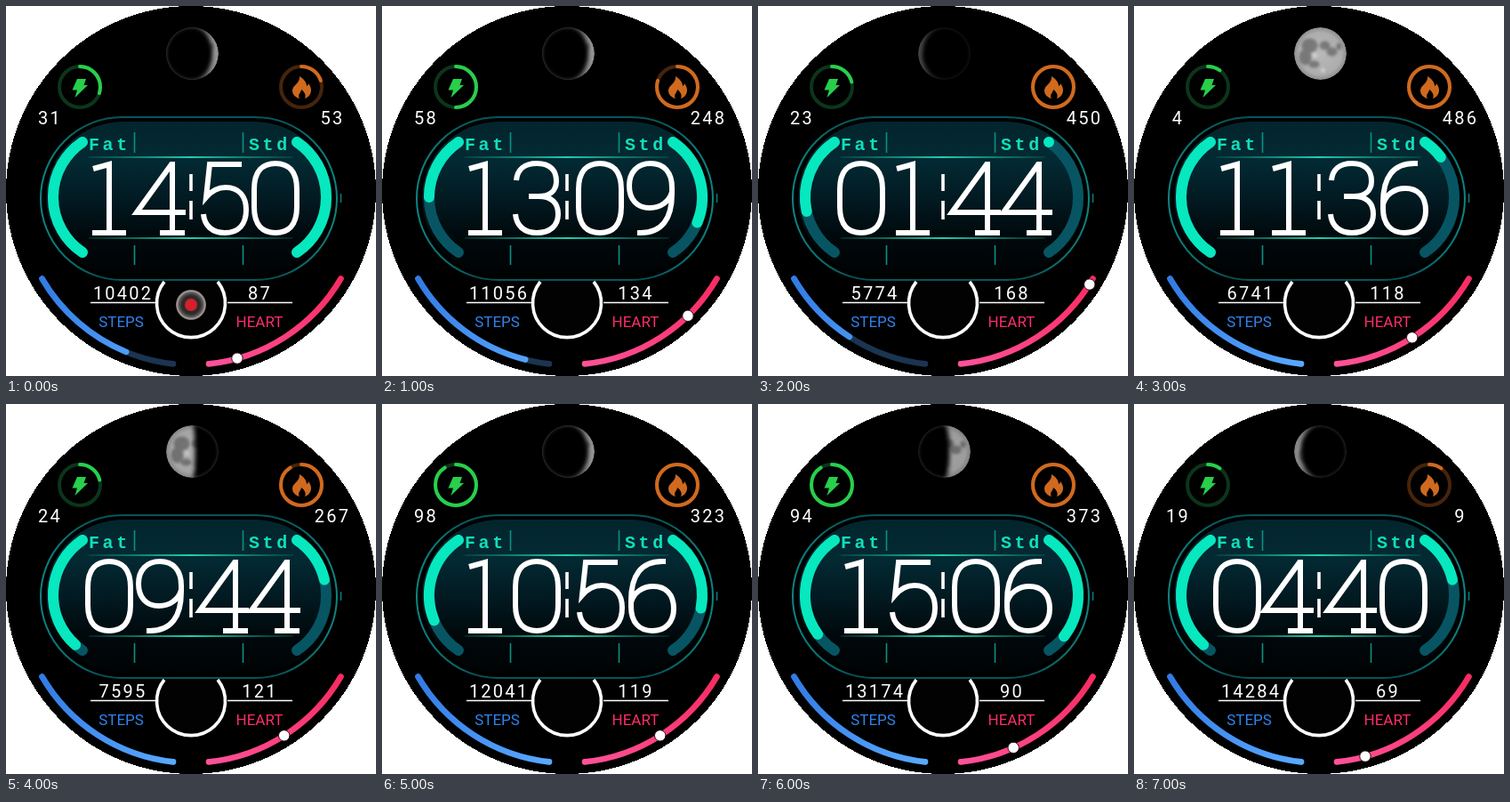
Animation of 416x416 px, one loop 8 s. Source, as an HTML page:

```html
<!DOCTYPE html>
<html lang="en">
<head>
<meta charset="utf-8">
<title>Watch face</title>
<style>
html, body { margin: 0; width: 100%; height: 100%; overflow: hidden; background: #fff; }
svg { display: block; width: 100vw; height: 100vh; }
text { font-family: Roboto, Arial, sans-serif; text-anchor: middle; }
.value { font-size: 20px; letter-spacing: 2.2px; fill: #fff; }
.label { font-size: 17px; }
.tag { font: bold 20px "Liberation Mono", monospace; letter-spacing: 3.6px; fill: #0fe0bb; text-anchor: start; }
.arc { fill: none; stroke-linecap: round; }
.gauge { stroke-width: 12; }
.ring { stroke-width: 4; }
.rim { stroke-width: 6.6; }
#time, #glyphs { fill: none; stroke: #fff; stroke-width: 6; }
</style>
</head>
<body>
<svg viewBox="0 0 416 416">
  <defs>
    <linearGradient id="panel" x1="0" y1="0" x2="0" y2="1">
      <stop offset="0" stop-color="#03252d"/>
      <stop offset=".25" stop-color="#032a33"/>
      <stop offset=".5" stop-color="#021a22"/>
      <stop offset=".76" stop-color="#00080b"/>
      <stop offset="1" stop-color="#000304"/>
    </linearGradient>
    <linearGradient id="edge">
      <stop offset="0" stop-color="#0c8583"/>
      <stop offset=".2" stop-color="#07555c"/>
      <stop offset=".8" stop-color="#07555c"/>
      <stop offset="1" stop-color="#0c8583"/>
    </linearGradient>
    <linearGradient id="beam" gradientUnits="userSpaceOnUse" x1="93" y1="0" x2="322" y2="0">
      <stop offset="0" stop-color="#14b99f" stop-opacity=".15"/>
      <stop offset=".5" stop-color="#1fd0b0"/>
      <stop offset="1" stop-color="#14b99f" stop-opacity=".15"/>
    </linearGradient>
    <linearGradient id="blue" gradientUnits="userSpaceOnUse" x1="40" y1="307" x2="190" y2="403">
      <stop offset="0" stop-color="#327be6"/>
      <stop offset="1" stop-color="#5aa9ff"/>
    </linearGradient>
    <linearGradient id="pink" gradientUnits="userSpaceOnUse" x1="378" y1="307" x2="227" y2="403">
      <stop offset="0" stop-color="#f92b62"/>
      <stop offset="1" stop-color="#ff5299"/>
    </linearGradient>
    <radialGradient id="lunar">
      <stop offset="0" stop-color="#b9b9b9"/>
      <stop offset=".8" stop-color="#adadad"/>
      <stop offset="1" stop-color="#8c8c8c"/>
    </radialGradient>
    <radialGradient id="button">
      <stop offset=".6" stop-color="#2c2a2a"/>
      <stop offset=".8" stop-color="#5c5757"/>
      <stop offset=".92" stop-color="#a59c9a"/>
      <stop offset="1" stop-color="#6a6464"/>
    </radialGradient>
    <filter id="soft" x="-30%" y="-30%" width="160%" height="160%"><feGaussianBlur stdDeviation="1.8"/></filter>
    <filter id="dusk" x="-40%" y="-30%" width="180%" height="160%"><feGaussianBlur stdDeviation="2.8"/></filter>
    <clipPath id="disc"><circle r="29.5"/></clipPath>
    <g id="glyphs">
      <path id="d0" d="M-24 30C-24 9-14 1 0 1S24 9 24 30V50C24 71 14 79 0 79S-24 71-24 50Z"/>
      <path id="d1" d="M-18 7L0 2V79M-19 79H19"/>
      <path id="d3" d="M-23 20C-22 8-14 1 0 1C15 1 22 9 22 21C22 32 14 38 2 38H-9M2 38C17 38 24 46 24 58C24 71 15 79 0 79C-14 79-23 71-24 58"/>
      <path id="d4" d="M28 56H-27L12 2H13V79M-1 79H27"/>
      <path id="d5" d="M20 2H-16L-20 39C-14 32-7 28 2 28C17 28 25 38 25 53C25 70 16 79 1 79C-13 79-22 71-23 58"/>
      <path id="d6" d="M16 1H12C-12 1-23 17-23 45V52C-23 69-14 79 1 79C16 79 25 69 25 54C25 38 16 29 2 29C-10 29-20 36-23 47"/>
      <use id="d9" href="#d6" transform="rotate(180 0 40)"/>
    </g>
  </defs>

  <circle cx="208" cy="208" r="208" shape-rendering="crispEdges"/>

  <g transform="translate(209.5 53.5)">
    <g id="moon" clip-path="url(#disc)">
      <circle r="29.5" fill="url(#lunar)"/>
      <g filter="url(#soft)" fill="#666" opacity=".75">
        <ellipse cx="-12" cy="-9" rx="9" ry="8"/>
        <ellipse cx="-17" cy="4" rx="7" ry="9"/>
        <ellipse cx="5" cy="-9" rx="6" ry="5"/>
        <ellipse cx="13" cy="-2" rx="6" ry="5"/>
        <ellipse cx="-7" cy="12" rx="6" ry="4"/>
        <ellipse cx="21" cy="-8" rx="3" ry="4"/>
        <circle cx="3" cy="19" r="2.5" fill="#ddd"/>
        <circle cx="-6" cy="2" r="2.5" fill="#ddd"/>
      </g>
      <path id="shade" fill="#030303" filter="url(#dusk)"/>
    </g>
  </g>

  <g class="arc ring">
    <circle cx="83" cy="91" r="23" stroke="#0b351a"/>
    <circle id="power" cx="83" cy="91" r="23" stroke="#28cf4b" pathLength="100" transform="rotate(-90 83 91)"/>
    <circle cx="332" cy="91" r="23" stroke="#46240a"/>
    <circle id="burn" cx="332" cy="91" r="23" stroke="#d06a1e" pathLength="100" transform="rotate(-90 332 91)"/>
  </g>
  <path fill="#28cf4b" d="M80 82H90L87.500 89H92L77.500 103L80 94.500H74.500Z"/>
  <path fill="#d06a1e" d="M330 79C335 82 338 86 338 90C340 89 340 88 340 87C343 91 344 95 342 99C340 103 336 104 336 104C338 100 335 96 332 94C332 98 327 99 330 104C326 103 322 100 322 95C322 89 331 87 330 79Z"/>
  <g class="value">
    <text id="powerText" x="49.500" y="133"/>
    <text id="burnText" x="367" y="133"/>
  </g>

  <g class="arc" stroke="#fff">
    <circle cx="208" cy="334" r="38" fill="#020202" stroke="none"/>
    <path d="M178 310A38.500 38.500 0 1 0 238 310" stroke-width="3.6" stroke-linecap="butt"/>
    <path d="M95 333.500H168M249 333.500H322" stroke-width="1.6" stroke-linecap="butt"/>
  </g>
  <g id="badge">
    <circle cx="208" cy="336" r="17" fill="url(#button)"/>
    <circle cx="208" cy="336" r="7" fill="#d3202a"/>
  </g>

  <rect x="39" y="125" width="333" height="183" rx="91.5" stroke="url(#edge)" stroke-width="2"/>
  <rect x="45" y="130" width="321" height="173" rx="86.5" fill="url(#panel)"/>
  <path d="M376.500 211V221" stroke="#0c7a78" stroke-width="1.6"/>
  <g stroke="url(#beam)" stroke-width="2">
    <path d="M93 170H322V170.010M93 261H322V261.010" fill="none"/>
  </g>
  <path d="M144.500 142V165M266.500 142V165M144.500 269V291M266.500 269V291" stroke="#0d8f82" stroke-width="1.6"/>
  <text class="tag" x="93" y="162">Fat</text>
  <text class="tag" x="273" y="162">Std</text>

  <g class="arc gauge" stroke="#075563">
    <path d="M86 153A74.700 74.700 0 0 0 86 277"/>
    <path d="M327 153A74.700 74.700 0 0 1 327 277"/>
    <g stroke="#07e8bf">
      <path id="left" pathLength="100" d="M86 153A74.700 74.700 0 0 0 86 277"/>
      <path id="right" pathLength="100" d="M327 153A74.700 74.700 0 0 1 327 277"/>
    </g>
  </g>

  <g id="time" role="img">
    <use x="116" y="176"/><use x="174" y="176"/><use x="245" y="176"/><use x="303" y="176"/>
    <path d="M208 189V208M208 219V240" stroke-width="3.6"/>
  </g>

  <g class="value">
    <text id="stepsText" x="131.500" y="329.5"/>
    <text id="heartText" x="285.500" y="329.5"/>
  </g>
  <text class="label" x="129.500" y="361" fill="#2f82ee">STEPS</text>
  <text class="label" x="285" y="361" fill="#fb2d68">HEART</text>

  <g class="arc rim">
    <path d="M40.500 306.500A195.300 195.300 0 0 0 188 402.4" stroke="#1b3450"/>
    <path id="steps" pathLength="100" d="M40.500 306.500A195.300 195.300 0 0 0 188 402.4" stroke="url(#blue)"/>
    <path d="M376.500 306.500A195.300 195.300 0 0 1 228 402.400" stroke="url(#pink)"/>
  </g>
  <circle id="dot" r="6.2" fill="#fff" stroke="#2a0a14"/>
</svg>
<script>
const $ = id => document.getElementById(id);
const digits = document.querySelectorAll('#time use');

// moon: [lit side (1 left, -1 right), terminator offset, brightness]
const fields = ['time', 'power', 'powerLevel', 'burn', 'burnLevel', 'left', 'right',
  'steps', 'stepsLevel', 'heart', 'heartAngle', 'moon', 'badge'];
const states = [
  ['1450', 31, 30, 53, 20, 100, 100, 10402, 70, 87, 74.7, [-1, -23, 1], 1],
  ['1309', 58, 50, 248, 80, 50, 70, 11056, 85, 134, 46, [-1, -23, 1], 0],
  ['0144', 23, 21, 450, 100, 61, 0, 5774, 50, 168, 32.6, [1, -25, .5], 0],
  ['1136', 4, 10, 486, 100, 100, 17, 6741, 100, 118, 57.7, [1, 31, 1], 0],
  ['0944', 24, 21, 267, 91, 93, 38, 7595, 100, 121, 57.7, [1, 3, .95], 0],
  ['1056', 98, 91, 323, 100, 70, 60, 12041, 100, 119, 57.7, [-1, -23, 1], 0],
  ['1506', 94, 91, 373, 100, 82, 84, 13174, 100, 90, 66.2, [-1, -6, .9], 0],
  ['0440', 19, 10, 9, 10, 93, 38, 14284, 100, 69, 74.7, [1, -22, .9], 0]
].map(row => Object.fromEntries(fields.map((name, i) => [name, row[i]])));

const fill = (id, level) => $(id).setAttribute('stroke-dasharray', `${level} 200`);

function drawMoon([side, edge, light]) {
  const sweep = edge < 0 ? 1 : 0;
  $('shade').setAttribute('d', `M0-31A31 31 0 0 1 0 31A${Math.abs(edge)} 31 0 0 ${sweep} 0-31Z`);
  $('shade').setAttribute('transform', `scale(${side} 1)`);
  $('moon').setAttribute('opacity', light);
}

function show(s) {
  digits.forEach((use, i) => use.setAttribute('href', '#d' + s.time[i]));
  $('time').setAttribute('aria-label', s.time.slice(0, 2) + ':' + s.time.slice(2));
  for (const id of ['power', 'burn', 'steps', 'heart']) $(id + 'Text').textContent = s[id];
  for (const id of ['power', 'burn', 'steps']) fill(id, s[id + 'Level']);
  fill('left', s.left);
  fill('right', s.right);
  const a = s.heartAngle * Math.PI / 180;
  $('dot').setAttribute('cx', 208.5 + 195 * Math.cos(a));
  $('dot').setAttribute('cy', 208 + 195 * Math.sin(a));
  drawMoon(s.moon);
  $('badge').setAttribute('visibility', s.badge ? 'visible' : 'hidden');
}

let current = -1;
const start = performance.now();
function tick() {
  const i = Math.floor((performance.now() - start) / 1000) % states.length;
  if (i !== current) show(states[current = i]);
  requestAnimationFrame(tick);
}
tick();
</script>
</body>
</html>
```
